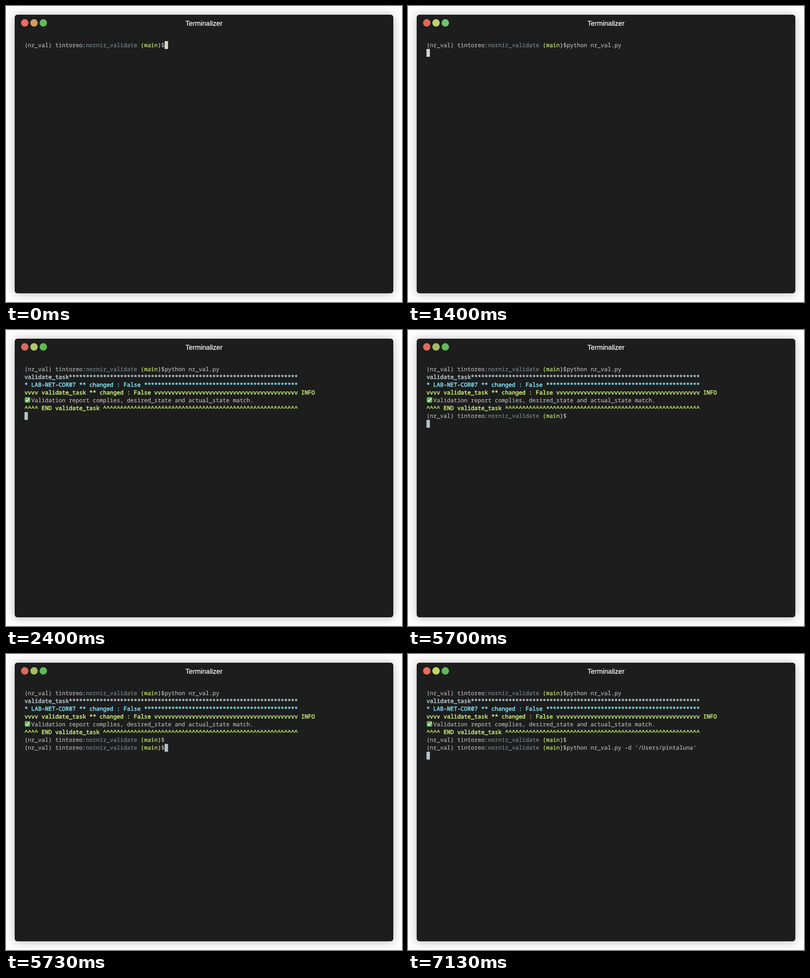
Animation, 866 px wide and 647 px high, one loop 8 s. Source, as an HTML page:

```html
<!DOCTYPE html>
<html lang="en">
<head>
<meta charset="utf-8">
<title>Terminal session</title>
<style>
html, body { margin: 0; width: 100%; height: 100%; overflow: hidden; background: #fefefe; }
#window {
  position: absolute; left: 19px; top: 19px; width: 828px; height: 609px;
  border-radius: 6px; background: #1d1d1d;
  box-shadow: 0 1px 20px rgba(0, 0, 0, .28);
}
svg { position: absolute; left: 0; top: 0; display: block; }
text { white-space: pre; text-rendering: geometricPrecision; fill: currentColor; stroke: currentColor; }
.title { font: 15px "Liberation Sans", Arial, sans-serif; color: #fff; stroke-width: .25px; text-anchor: middle; }
.term { font: 12.46px "Noto Sans Mono", "DejaVu Sans Mono", monospace; color: #b8b8b8; stroke-width: .2px; }
tspan { fill: currentColor; stroke: currentColor; }
.path { color: #78898d; }
.branch { color: #cdf078; }
.task, .host, .result { stroke-width: .55px; }
.task { color: #b8cdd1; }
.host { color: #82e2f4; }
.result { color: #cdf078; }
</style>
</head>
<body>
<div id="window"></div>
<svg id="stage" width="866" height="647" viewBox="0 0 866 647">
  <circle class="dot" cx="41" cy="36.9" r="8.1"/>
  <circle class="dot" cx="61.3" cy="36.9" r="8.1"/>
  <circle class="dot" cx="81.6" cy="36.9" r="8.1"/>
  <text class="title" x="433" y="42.8">Terminalizer</text>
  <rect id="cursor" width="7.5" height="17.1"/>
</svg>
<script>
const LOOP = 8000;
const LEFT = 40.4, TOP = 76.8, CELL = 7.475, LINE = 17.1;
const PROMPT_COLS = 41;

const svg = document.getElementById('stage');
const cursor = document.getElementById('cursor');
const dots = document.querySelectorAll('.dot');
const parts = [];

function add(tag, attrs, parent = svg) {
  const el = document.createElementNS('http://www.w3.org/2000/svg', tag);
  for (const key in attrs) el.setAttribute(key, attrs[key]);
  return parent.appendChild(el);
}

// Each span is [text, class]; the line shows from the given time on.
function write(start, row, col, ...spans) {
  const line = add('text', { class: 'term', x: LEFT + col * CELL, y: TOP + row * LINE + 12.8 });
  for (const [str, cls] of spans) add('tspan', { class: cls || '' }, line).textContent = str;
  parts.push({ el: line, start });
}

function prompt(start, row) {
  write(start, row, 0, ['(nr_val) tintoreo:'], ['nornir_validate', 'path'], [' '], ['(main)', 'branch'], ['$']);
}

function checkMark(start, row) {
  const y = TOP + row * LINE + 1.6;
  const mark = add('g', { transform: `translate(41 ${y})` });
  add('rect', { width: 12, height: 12, rx: 2, fill: '#5cba52' }, mark);
  add('path', { d: 'M2.6 6.6 L5 9.2 L9.6 2.6', fill: 'none', stroke: '#fff', 'stroke-width': 1.7 }, mark);
  parts.push({ el: mark, start });
}

prompt(0, 0);
write(1000, 0, PROMPT_COLS, ['python nr_val.py']);
write(2400, 1, 0, ['validate_task' + '*'.repeat(67), 'task']);
write(2400, 2, 0, ['* LAB-NET-COR07 ** changed : False ' + '*'.repeat(45), 'host']);
write(2400, 3, 0, ['vvvv validate_task ** changed : False ' + 'v'.repeat(42) + ' INFO', 'result']);
checkMark(2400, 4);
write(2400, 4, 2, ['Validation report complies, desired_state and actual_state match.']);
write(2400, 5, 0, ['^^^^ END validate_task ' + '^'.repeat(57), 'result']);
prompt(3700, 6);
prompt(5730, 7);
write(6730, 7, PROMPT_COLS, ["python nr_val.py -d '/Users/pintaluna'"]);

// start, cursor row, cursor column, cursor colour, button colours
const steps = [
  [0, 0, 41, '#d6dac0', ['#ee6a62', '#d19d60', '#63b85a']],
  [1000, 0, 57, '#d5d5d0', ['#e0665c', '#c0d06a', '#63b85a']],
  [1400, 1, 0, '#d5d5d0', ['#e0665c', '#c0d06a', '#6cc472']],
  [2400, 6, 0, '#b1c6ca', ['#dc6a60', '#b5c46e', '#5cba52']],
  [3700, 6, 41, '#b1c6ca', ['#ee6a60', '#c0db60', '#6cc066']],
  [5700, 7, 0, '#b1c6ca', ['#dc6a60', '#a8ba64', '#5cba58']],
  [5730, 7, 41, '#b1c6ca', ['#dc6a60', '#a8ba64', '#5cba58']],
  [6730, 7, 79, '#b1c6ca', ['#ee6a60', '#c0d860', '#5cba58']],
  [7130, 8, 0, '#b1c6ca', ['#ee6a60', '#c0d860', '#5cba58']]
];

function draw(time) {
  const [, row, col, color, buttons] = steps.filter(step => step[0] <= time).pop();
  for (const { el, start } of parts) el.style.display = time >= start ? '' : 'none';
  cursor.setAttribute('x', LEFT + col * CELL);
  cursor.setAttribute('y', TOP + row * LINE);
  cursor.setAttribute('fill', color);
  dots.forEach((dot, i) => dot.setAttribute('fill', buttons[i]));
}

const origin = performance.now();
function tick() {
  draw((performance.now() - origin) % LOOP);
  requestAnimationFrame(tick);
}
tick();
</script>
</body>
</html>
```
